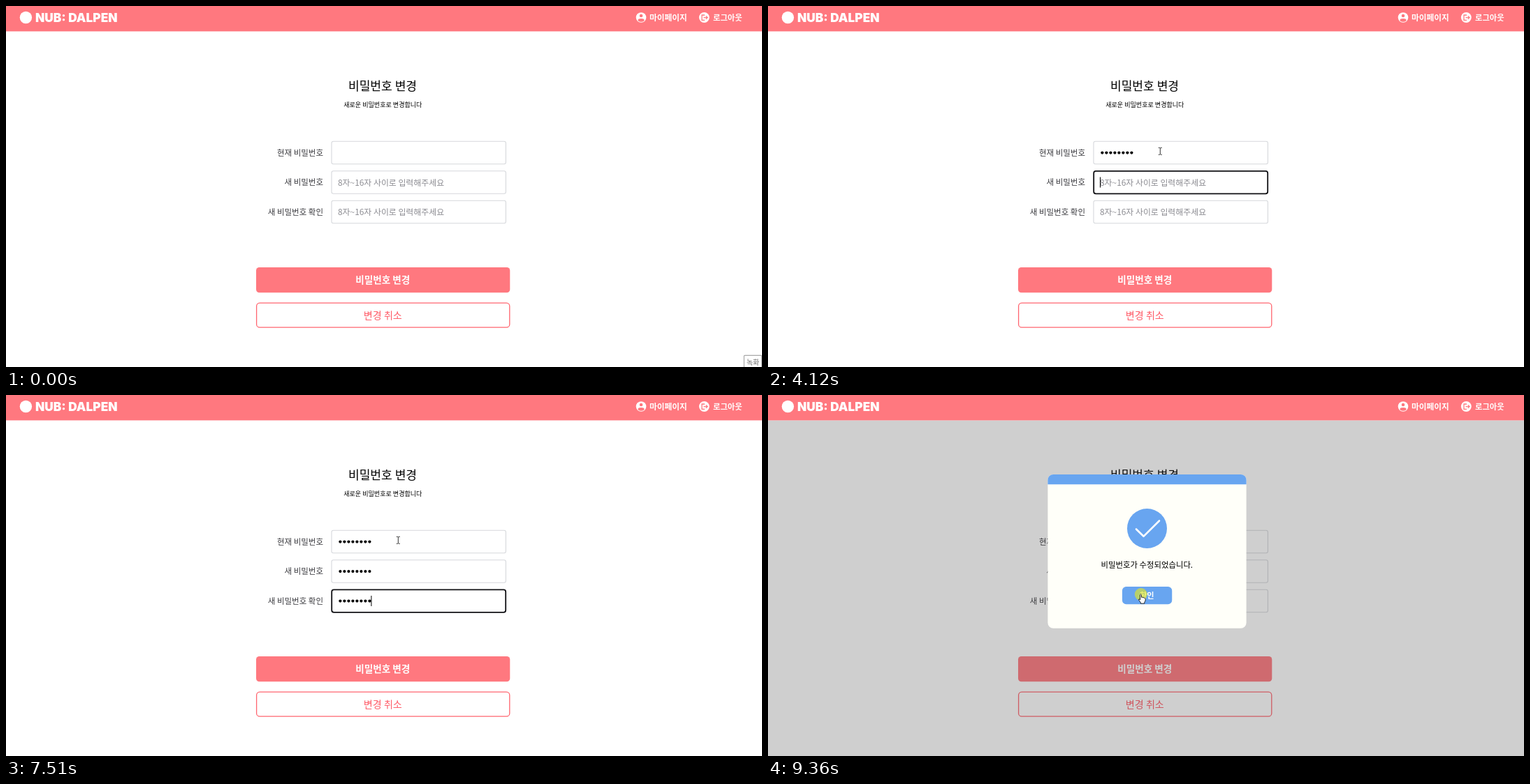
An HTML page with a canvas that plays this animation: 1082x518 px, repeating every 9.43 s.

```html
<!DOCTYPE html>
<html lang="ko">
<head>
<meta charset="utf-8">
<title>비밀번호 변경</title>
<style>
  html, body { margin: 0; width: 100%; height: 100%; overflow: hidden; background: #fff; }
  canvas { display: block; }
</style>
</head>
<body>
<canvas id="stage" width="1082" height="518"></canvas>
<script>
const ctx = document.getElementById('stage').getContext('2d');
const LOOP = 9430, TICK = 66.4, BLINK = 530;
const PINK = '#ff787f', HOT = '#ff4954', BLUE = '#68a5f0';
const KR = '"Noto Sans CJK KR", "Noto Sans CJK", "Noto Sans KR", sans-serif';
const HINT = '8자~16자 사이로 입력해주세요';
const BLUR = 8420, MODAL = 8770;

// Each field: when it gets focus and when each key is pressed.
const fields = [
  { label: '현재 비밀번호', hint: '', y: 194, focus: 860,
    keys: [1980, 2050, 2180, 2250, 2380, 2510, 3330, 3520] },
  { label: '새 비밀번호', hint: HINT, y: 236.5, focus: 4120,
    keys: [4510, 4640, 4850, 4980, 5250, 5380, 5510, 5640] },
  { label: '새 비밀번호 확인', hint: HINT, y: 279, focus: 5970,
    keys: [6240, 6380, 6580, 6710, 6980, 7120, 7310, 7510] }
];
const clicks = [[800, 930], [8360, 8490], [9350, LOOP]];

const start = { x: 1068, y: 508 }, inField = { x: 561, y: 208 };
const onButton = { x: 598.5, y: 379 }, onOk = { x: 533.5, y: 286 };
const moves = [
  { from: 60, to: 800, a: start, b: { x: 790, y: 150 }, c: inField },
  { from: 8090, to: 8360, a: inField, b: { x: 585, y: 300 }, c: onButton },
  { from: 8830, to: 9240, a: onButton, b: { x: 560, y: 325 }, c: onOk }
];

function text(str, x, midY, size, color, align = 'left', weight = 400, family = KR) {
  ctx.font = `${weight} ${size}px ${family}`;
  ctx.textAlign = align;
  ctx.fillStyle = color;
  ctx.fillText(str, x, midY + size * 0.365);
}

function box(x, y, w, h, r, fill, stroke, line = 1) {
  ctx.beginPath();
  ctx.roundRect(x, y, w, h, r);
  if (fill) { ctx.fillStyle = fill; ctx.fill(); }
  if (stroke) { ctx.strokeStyle = stroke; ctx.lineWidth = line; ctx.stroke(); }
}

function disc(x, y, r, fill) {
  ctx.beginPath();
  ctx.arc(x, y, r, 0, 7);
  ctx.fillStyle = fill;
  ctx.fill();
}

function line(points, color, width) {
  ctx.beginPath();
  points.forEach(([x, y]) => ctx.lineTo(x, y));
  ctx.strokeStyle = color;
  ctx.lineWidth = width;
  ctx.stroke();
}

function drawHeader() {
  ctx.fillStyle = PINK;
  ctx.fillRect(0, 0, 1082, 36.4);
  disc(28.4, 16.5, 8.7, '#fff');
  text('NUB: DALPEN', 42, 16.5, 17.3, '#fff', 'left', 900, 'Inter, sans-serif');

  disc(909, 16.5, 7.3, '#fff');
  disc(909, 14, 2.3, PINK);
  ctx.beginPath();
  ctx.ellipse(909, 20.3, 4.5, 2.4, 0, 0, 7);
  ctx.fill();
  text('마이페이지', 921, 16.8, 11.7, '#fff', 'left', 700);

  disc(999.3, 16.5, 7.4, '#fff');
  line([[1000, 13], [996, 13], [996, 20.3], [1000, 20.3]], PINK, 1.3);
  line([[998.5, 16.6], [1004, 16.6]], PINK, 1.3);
  line([[1001.8, 14.4], [1004, 16.6], [1001.8, 18.8]], PINK, 1.3);
  text('로그아웃', 1012, 16.8, 11.3, '#fff', 'left', 700);
}

function drawField(field, t, active) {
  const mid = field.y + 16.7;
  const typed = field.keys.filter(k => k <= t).length;
  text(field.label, 454, mid, 11.5, '#3c3c40', 'right');
  if (active) box(466.2, field.y + 0.4, 249, 32.4, 3, '#fff', '#101014', 1.8);
  else box(466, field.y + 0.2, 249.4, 32.6, 2.5, '#fff', '#d6d8dc', 1.1);
  if (!typed) text(field.hint, 475, mid, 11.9, '#8c8c92');
  for (let i = 0; i < typed; i++) disc(478.4 + 6 * i, mid - 0.1, 2.1, '#000');

  const last = typed ? field.keys[typed - 1] : field.focus;
  if (active && (t - last) % (2 * BLINK) < BLINK) {
    ctx.fillStyle = '#000';
    ctx.fillRect(475 + 6 * typed - (typed ? 0.6 : 0), field.y + 9, 1, 15);
  }
}

function drawForm(t, hover) {
  text('비밀번호 변경', 539, 115, 17.1, '#000', 'center', 500);
  text('새로운 비밀번호로 변경합니다', 539.3, 142, 9.05, '#000', 'center', 500);
  const current = t < BLUR ? fields.filter(f => f.focus <= t).pop() : null;
  fields.forEach(f => drawField(f, t, f === current));
  box(358, 375, 363.3, 36.2, 4.5, hover ? HOT : PINK);
  text('비밀번호 변경', 539.2, 393.2, 13.6, '#fff', 'center', 700);
  box(358.6, 426.2, 362.2, 35, 4.5, '#fff', '#ff6670', 1.3);
  text('변경 취소', 539.3, 443.8, 14.1, '#ff5c68', 'center');
}

function drawModal(hover) {
  ctx.fillStyle = 'rgba(64,64,64,.25)';
  ctx.fillRect(0, 36.4, 1082, 482);
  box(400.4, 114, 284.2, 220.8, 8, '#fffff9');
  box(400.4, 114, 284.2, 14.2, [8, 8, 0, 0], BLUE);
  disc(542.5, 191.5, 28.5, BLUE);
  ctx.lineCap = ctx.lineJoin = 'round';
  line([[527, 192.5], [537.5, 202.8], [560, 180.5]], '#fff', 2.6);
  ctx.lineCap = 'butt';
  ctx.lineJoin = 'miter';
  text('비밀번호가 수정되었습니다.', 542.3, 244, 11.4, '#000', 'center', 500);
  box(507.6, 275.7, 70, 23.8, 5, hover ? BLUE : '#fffff9', BLUE, 1.3);
  text('확인', 542.3, 287.5, 11.2, hover ? '#fff' : BLUE, 'center', hover ? 700 : 500);
}

const arrow = new Path2D('M0 0V9.4L2.1 7.5L3.6 11L5.3 10.3L3.8 6.9H6.6Z');
const hand = new Path2D('M-.9 .8Q.1 -.8 1 .8V4.3L2.3 4.1L3 4.8L4.4 4.6L5 5.3Q6.6 4.8 6.6 6.3' +
  'V9.2L5.3 11.4V13.2H-.2V11.8L-3 8Q-3.2 6.6 -1.8 7L-.9 8Z');

function drawCursor({ x, y }, kind) {
  if (kind === 'beam') {
    const side = [[-2.5, -5], [-0.8, -5], [0, -4.3]];
    [1, -1].forEach(sx => [1, -1].forEach(sy =>
      line(side.map(([dx, dy]) => [x + 0.3 + dx * sx, y + 0.3 + dy * sy]), '#333', 1)));
    line([[x + 0.3, y - 4.2], [x + 0.3, y + 4.8]], '#333', 1);
    return;
  }
  ctx.save();
  ctx.translate(x, y);
  ctx.fillStyle = '#fff';
  ctx.strokeStyle = '#111';
  ctx.lineWidth = 0.9;
  const shape = kind === 'hand' ? hand : arrow;
  ctx.fill(shape);
  ctx.stroke(shape);
  ctx.restore();
}

function cursorAt(t) {
  const m = moves.filter(v => v.from <= t).pop() || moves[0];
  const p = Math.min(1, Math.max(0, (t - m.from) / (m.to - m.from)));
  const u = p * p * (3 - 2 * p), v = 1 - u;
  const mix = k => v * v * m.a[k] + 2 * u * v * m.b[k] + u * u * m.c[k];
  return { x: mix('x'), y: mix('y') };
}

const within = (p, x, y, w, h) => p.x >= x && p.x <= x + w && p.y >= y && p.y <= y + h;

function draw(t) {
  const pos = cursorAt(Math.floor(t / TICK + 0.1) * TICK);
  const modal = t >= MODAL;
  const overButton = !modal && within(pos, 358, 375, 363, 36);
  const overOk = modal && within(pos, 507, 275, 71, 25);
  const overField = !modal && fields.some(f => within(pos, 466, f.y, 250, 33));

  ctx.fillStyle = '#fff';
  ctx.fillRect(0, 0, 1082, 518);
  drawForm(t, overButton);
  if (modal) drawModal(overOk);
  drawHeader();

  if (t < 66) {
    box(1056.3, 501.3, 25.2, 22, 1, '#fff', '#a8a8a8', 1.2);
    text('녹화', 1069, 511, 9.8, '#666', 'center');
    return;
  }
  if (clicks.some(([a, b]) => t >= a && t < b)) disc(pos.x + 0.3, pos.y, 9, 'rgba(235,235,20,.6)');
  drawCursor(pos, overButton || overOk ? 'hand' : overField ? 'beam' : 'arrow');
}

const origin = performance.now();
function frame() {
  draw((performance.now() - origin) % LOOP);
  requestAnimationFrame(frame);
}
frame();
</script>
</body>
</html>
```
